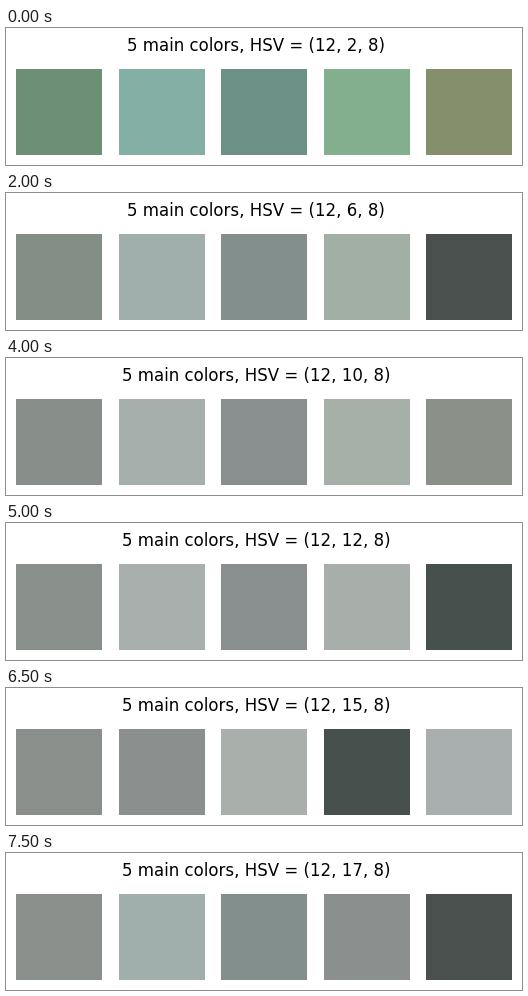
Write a matplotlib script that moves like this. It is 516x137 px and loops after 8000 ms.

```python
import colorsys

import matplotlib.pyplot as plt
from matplotlib.animation import FuncAnimation
from matplotlib.patches import Rectangle

W, H, DPI = 516, 137, 100
HUES, VALUES = 12, 8
FIRST, LAST = 2, 17          # range of saturation bin counts
SIDE, LEFT, TOP, PITCH = 86, 10, 41, 102.62

# Colour bins as (hue, saturation, value) indices
GREEN, TEAL = (4, 0, 4), (5, 0, 4)
PALE_GREEN, PALE_TEAL = (4, 0, 5), (5, 0, 5)
OLIVE, MOSS = (2, 0, 4), (3, 0, 4)
DARK, DARK_TEAL = (5, 0, 2), (5, 1, 2)
SOFT_TEAL, MID_TEAL = (5, 1, 5), (5, 1, 4)

# Ranking of the main bins, valid from the given saturation count upward
RANKINGS = [
    (2, [GREEN, PALE_TEAL, TEAL, PALE_GREEN, OLIVE]),
    (3, [GREEN, PALE_TEAL, TEAL, PALE_GREEN, DARK]),
    (8, [GREEN, PALE_TEAL, TEAL, PALE_GREEN, MOSS]),
    (12, [GREEN, PALE_TEAL, TEAL, PALE_GREEN, DARK_TEAL]),
    (13, [GREEN, TEAL, PALE_GREEN, PALE_TEAL, DARK_TEAL]),
    (15, [GREEN, TEAL, PALE_GREEN, DARK_TEAL, PALE_TEAL]),
    (16, [GREEN, SOFT_TEAL, MID_TEAL, PALE_GREEN, DARK_TEAL]),
    (17, [GREEN, SOFT_TEAL, MID_TEAL, TEAL, DARK_TEAL]),
]


def bin_color(bins, sats):
    """RGB colour at the centre of an HSV bin."""
    h, s, v = bins
    return colorsys.hsv_to_rgb((h + 0.5) / HUES, (s + 0.5) / sats, (v + 0.5) / VALUES)


def main_bins(sats):
    return [bins for start, bins in RANKINGS if start <= sats][-1]


fig = plt.figure(figsize=(W / DPI, H / DPI), dpi=DPI, facecolor="white")
ax = fig.add_axes([0, 0, 1, 1])
ax.set_xlim(0, W)
ax.set_ylim(H, 0)
ax.axis("off")

swatches = [
    ax.add_patch(Rectangle((round(LEFT + i * PITCH), TOP), SIDE, SIDE,
                           linewidth=0, antialiased=False))
    for i in range(5)
]
title = ax.text(250, 23, "", ha="center", va="baseline",
                fontsize=12, family="DejaVu Sans", color="black")


def update(frame):
    sats = FIRST + frame
    title.set_text(f"5 main colors, HSV = ({HUES}, {sats}, {VALUES})")
    for swatch, bins in zip(swatches, main_bins(sats)):
        swatch.set_facecolor(bin_color(bins, sats))
    return [title, *swatches]


anim = FuncAnimation(fig, update, frames=LAST - FIRST + 1, interval=500,
                     repeat=True, repeat_delay=0, blit=False)
plt.show()
```
